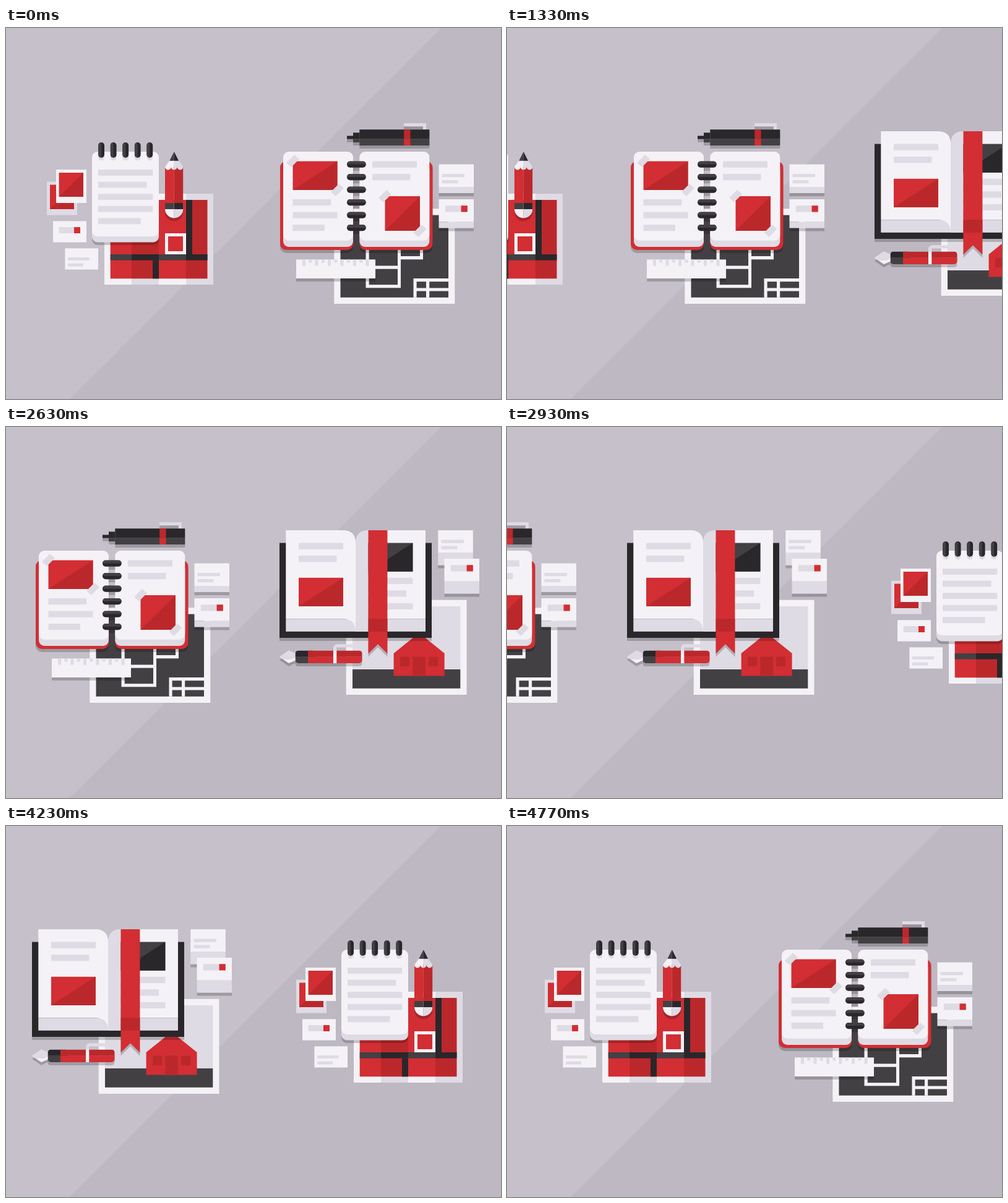
Write an HTML page with a canvas that moves like this. It is 800 px wide and 600 px high and loops after 4800 ms.

```html
<!DOCTYPE html>
<html lang="en">
<head>
<meta charset="utf-8">
<title>Stationery carousel</title>
<style>
html, body { margin: 0; width: 100%; height: 100%; overflow: hidden; background: #bdb8c2; }
canvas { display: block; }
</style>
</head>
<body>
<canvas id="stage" width="800" height="600"></canvas>
<script>
const ctx = document.getElementById('stage').getContext('2d');
const WHITE = '#f4f2f6', PALE = '#dfdbe4', RED = '#d22e33', DARK_RED = '#bb282b',
  BLACK = '#2a272b', GREY = '#434044', SHADOW = 'rgba(0,0,0,.2)';

// Boxes are given by their edges: left, top, right, bottom.
function box(color, l, t, r, b) {
  ctx.fillStyle = color;
  ctx.fillRect(l, t, r - l, b - t);
}
function round(color, l, t, r, b, radius) {
  ctx.fillStyle = color;
  ctx.beginPath();
  ctx.roundRect(l, t, r - l, b - t, radius);
  ctx.fill();
}
function path(color, d) {
  ctx.fillStyle = color;
  ctx.fill(new Path2D(d));
}
function clipped(l, t, r, b, draw) {
  ctx.save();
  ctx.beginPath();
  ctx.rect(l, t, r - l, b - t);
  ctx.clip();
  draw();
  ctx.restore();
}
function photo(l, t, r, b, base = RED, shade = DARK_RED) {
  box(base, l, t, r, b);
  path(shade, `M${r} ${t}V${b}H${l}Z`);
}
function tape(x, y) {
  path(PALE, `M${x - 10.5} ${y + 3}l13 -13 8 7 -13 13Z`);
}
function lines(x, y, gap, height, ends) {
  ends.forEach((end, i) => box(PALE, x, y + i * gap, end, y + i * gap + height));
}
function thickCard(x, y, depth) {
  box(SHADOW, x, y + 36.5 + depth, x + 56.5, y + 41.5 + depth);
  box(PALE, x, y + 36.5, x + 56.5, y + 36.5 + depth);
  box(WHITE, x, y, x + 56.5, y + 36.5);
}
function textCard(x, y, depth) {
  thickCard(x, y, depth);
  lines(x + 5, y + 15.5, 10, 5.2, [x + 41.5, x + 31]);
}
function labelCard(x, y, depth) {
  thickCard(x, y, depth);
  box(PALE, x + 10.3, y + 10.2, x + 36, y + 20.5);
  box(RED, x + 36, y + 10.2, x + 46.3, y + 20.5);
}

function notepadScene() {
  // folded map
  for (let i = 0; i < 4; i++) {
    const l = 159 + i * 44, odd = i % 2;
    const left = Math.max(l, 168.7), right = Math.min(l + 44, 325.5);
    box(odd ? PALE : WHITE, l, 268, l + 44, 415);
    box(odd ? DARK_RED : RED, left, 278, right, 405.3);
    box(odd ? BLACK : GREY, left, 366, right, 375.7);
  }
  box(BLACK, 291, 278, 301, 366);
  box(BLACK, 237, 375.7, 247, 405.3);
  box(WHITE, 257, 332, 291, 366);
  box(RED, 262, 337, 286, 361);

  // notepad
  round(SHADOW, 139, 210, 247, 351, 9);
  round(PALE, 139, 210, 247, 346.5, 9);
  round(WHITE, 139, 200, 247, 337, 9);
  lines(149, 229, 19.6, 9.8, [237.3, 227.5, 237.3, 237.3, 217.6]);
  for (let i = 0; i < 5; i++) {
    const x = 149.2 + i * 19.55;
    clipped(x, 200, x + 10, 216, () => round(PALE, x, 190, x + 9.8, 214.5, 5));
    round(BLACK, x, 185, x + 9.8, 209.7, 5);
    clipped(x, 184, x + 4.9, 211, () => round(GREY, x, 185, x + 9.8, 209.7, 5));
  }

  // pencil
  round(SHADOW, 257, 283, 286.4, 312.3, [0, 0, 14.7, 14.7]);
  const pencilHalf = (l, r, body, wood, dark) => clipped(l, 199, r, 309, () => {
    round(wood, 257, 283, 286.4, 307.4, [0, 0, 14.7, 14.7]);
    box(body, 257, 224, 286.4, 283);
    box(dark, 257, 283, 286.4, 293);
    path(wood, 'M264.3 214.5H279.1L286.4 224.5a4.9 4.9 0 0 1-9.8 0a4.9 4.9 0 0 1-9.8 0a4.9 4.9 0 0 1-9.8 0Z');
    path(dark, 'M271.7 200L279.1 214.7H264.3Z');
  });
  pencilHalf(257, 271.7, RED, WHITE, GREY);
  pencilHalf(271.7, 286.5, DARK_RED, PALE, BLACK);

  // prints and cards
  box(PALE, 66, 248.6, 115, 302.5);
  photo(71, 253.5, 110, 293);
  box(WHITE, 81, 229, 130, 283);
  photo(85.6, 234, 125, 273);
  box(WHITE, 76, 312.3, 130, 346.6);
  box(PALE, 85.6, 322, 110, 332);
  box(RED, 110, 322, 120, 332);
  box(WHITE, 95.4, 356.3, 149, 390.6);
  lines(100, 371, 9.6, 5, [134.7, 125]);
}

function binderScene() {
  // floor plan
  box(WHITE, 530.3, 292.3, 725.3, 446);
  box(GREY, 540.5, 302.6, 715, 435.8);
  box(WHITE, 581.5, 340, 638, 420.3);
  box(GREY, 586.7, 340, 633, 384.5);
  box(GREY, 586.7, 389.7, 633, 415.2);
  box(WHITE, 638, 340, 674, 374.3);
  box(GREY, 638, 340, 669, 369);
  box(WHITE, 658.5, 405, 715, 435.8);
  for (const y of [410.2, 425.5]) {
    box(GREY, 663.6, y, 679, y + 10.3);
    box(GREY, 684.2, y, 715, y + 10.3);
  }

  textCard(699.5, 220.5, 10);
  labelCard(699.5, 277, 10);

  // covers and pages
  for (const x of [443, 571.3]) round(SHADOW, x, 220, x + 118.2, 364, 10);
  for (const x of [443, 571.3]) round(RED, x, 215.5, x + 118.2, 359, 10);
  for (const x of [448, 571.3]) {
    round(PALE, x, 220, x + 113, 354, 9);
    round(WHITE, x, 200, x + 113, 343.7, 9);
  }
  photo(463.5, 215.5, 535.5, 262);
  tape(463.5, 215);
  tape(535.5, 262);
  lines(463.5, 277, 20.5, 10.2, [525.3, 535.5, 515]);
  lines(592, 215.5, 20.5, 10.2, [664, 653.5]);
  photo(612.5, 272, 669, 328);
  tape(612.5, 271.7);
  tape(669, 328);
  for (let i = 0; i < 6; i++) {
    const y = 215.5 + i * 20.5;
    box(SHADOW, 561, y + 10.2, 571.3, y + 15.3);
    round(BLACK, 551, y, 581.7, y + 10.3, 5);
    clipped(551, y, 582, y + 5, () => round(GREY, 551, y, 581.7, y + 10.3, 5));
  }

  // ruler
  box(SHADOW, 469, 405, 597, 410);
  box(WHITE, 469, 374.4, 597, 405);
  for (let i = 0; i < 11; i++) {
    const x = 479 + i * 10.25;
    box(PALE, x, 374.4, x + 5, i % 2 ? 379.5 : 384.6);
  }

  // marker
  path(SHADOW, 'M551 179.6h10v-5h10.3v-5H684.3V195H571.3V190H561V184.7H551Z');
  box(SHADOW, 643, 159, 674, 164.2);
  path(PALE, 'M643 154H679V164.2H674V159.2H643Z');
  box(BLACK, 551, 174.4, 561, 179.6);
  for (const [top, bottom, color, band] of [[164.2, 179.6, BLACK, DARK_RED], [179.6, 190, GREY, RED]]) {
    box(color, 571.3, top, 684.3, bottom);
    box(color, 561, Math.max(top, 169.3), 571.3, Math.min(bottom, 185));
    box(band, 643.2, top, 653.5, bottom);
  }
}

function bookScene() {
  // house picture
  box(WHITE, 549.7, 279.7, 744.5, 433);
  box(PALE, 560, 290, 734.3, 392);
  box(GREY, 560, 392, 734.3, 422.8);
  path(RED, 'M626.6 366L667.6 333L708.6 366V402.5H626.6Z');
  box(DARK_RED, 637, 371.7, 652.3, 387);
  box(DARK_RED, 683, 371.7, 698.3, 387);
  box(DARK_RED, 657.3, 371.7, 678, 402.5);

  textCard(698.3, 167, 20);
  labelCard(708.5, 213, 20);

  // book
  box(SHADOW, 442, 192.5, 688, 346);
  box(BLACK, 442, 187.5, 688, 341);
  box(PALE, 452.3, 310.3, 678, 330.8);
  path(PALE, 'M565 330.8V187.5Q565 167 585.5 167V330.8Z');
  box(WHITE, 585.5, 167, 678, 310.3);
  path(WHITE, 'M452.3 167H544.5Q565 167 565 187.5V330.8Q565 310.3 544.5 310.3H452.3Z');
  lines(473, 187.5, 20.5, 10.2, [545, 534.5]);
  photo(473, 243.8, 545, 290);
  photo(585.5, 187.5, 657.4, 233.7, GREY, BLACK);
  lines(585.5, 243.8, 20.5, 10.2, [657.4, 647, 657.4]);

  // ribbon
  path(SHADOW, 'M585.5 341H616.4V371.7L601 356.3L585.5 371.7Z');
  path(RED, 'M585.5 167H616.4V366.6L601 351.2L585.5 366.6Z');
  box(DARK_RED, 585.5, 310.3, 616.4, 330.8);

  // fountain pen
  path(SHADOW, 'M442 376.7L457 366.5L468 371H575.5V382Q575.5 387 570 387H472Q468 387 467 382L457 387Z');
  path(PALE, 'M529 361.4V357Q530 351.2 536 351.2H560Q570 351.2 570.5 361.4H565Q565 356.4 560 356.4H534.3V361.4Z');
  path(WHITE, 'M442 371.7L457 361.4L469 366.5V377L457 382Z');
  path(PALE, 'M442 371.7L457 361.4L469 366.5V371.7L462 376H450Z');
  for (const [top, bottom, dark, red] of [[361.4, 371.7, BLACK, DARK_RED], [371.7, 382, GREY, RED]]) {
    clipped(467, top, 576, bottom, () => {
      round(dark, 467.7, 361.4, 500, 382, 5);
      round(red, 488, 361.4, 575.5, 382, [0, 5, 5, 0]);
    });
  }
  box(WHITE, 529, 361.4, 534.3, 382);
}

// For each scene: start and end offset in each of the three slides.
const scenes = [
  [notepadScene, [[-0.4, -402], [799, 399], [399, -0.4]]],
  [binderScene, [[0, -399], [-399, -801], [400, 0]]],
  [bookScene, [[396, -4], [-4, -404], [-404, -806]]],
];
const SLIDE = 1600, PAUSE = 1000, FRAME = 30, STEPS = 20, OVERSHOOT = 0.021;

// Symmetric cubic bezier (.41, 0, .59, 1)
function easeInOut(x) {
  let low = 0, high = 1, u;
  for (let i = 0; i < 24; i++) {
    u = (low + high) / 2;
    const bx = 1.23 * u * (1 - u) ** 2 + 1.77 * u * u * (1 - u) + u ** 3;
    if (bx < x) low = u; else high = u;
  }
  return u * u * (3 - 2 * u);
}
// Short pull back, long slide past the end, short settle.
function slideProgress(p) {
  if (p <= 0) return 0;
  if (p < 0.1) return -OVERSHOOT * easeInOut(p / 0.1);
  if (p < 0.9) return -OVERSHOOT + (1 + 2 * OVERSHOOT) * easeInOut((p - 0.1) / 0.8);
  return 1 + OVERSHOOT * (1 - easeInOut((p - 0.9) / 0.1));
}

function draw(time) {
  const t = time % (3 * SLIDE), slide = Math.floor(t / SLIDE);
  const progress = slideProgress(Math.floor((t % SLIDE - PAUSE) / FRAME) / STEPS);
  box('#bdb8c2', 0, 0, 800, 600);
  path('#c5c0ca', 'M0 0H703L103 600H0Z');
  for (const [drawScene, slides] of scenes) {
    const [from, to] = slides[slide];
    ctx.save();
    ctx.translate(Math.round(from + (to - from) * progress), 0);
    drawScene();
    ctx.restore();
  }
}

const start = performance.now();
function tick() {
  draw(performance.now() - start);
  requestAnimationFrame(tick);
}
tick();
</script>
</body>
</html>
```
